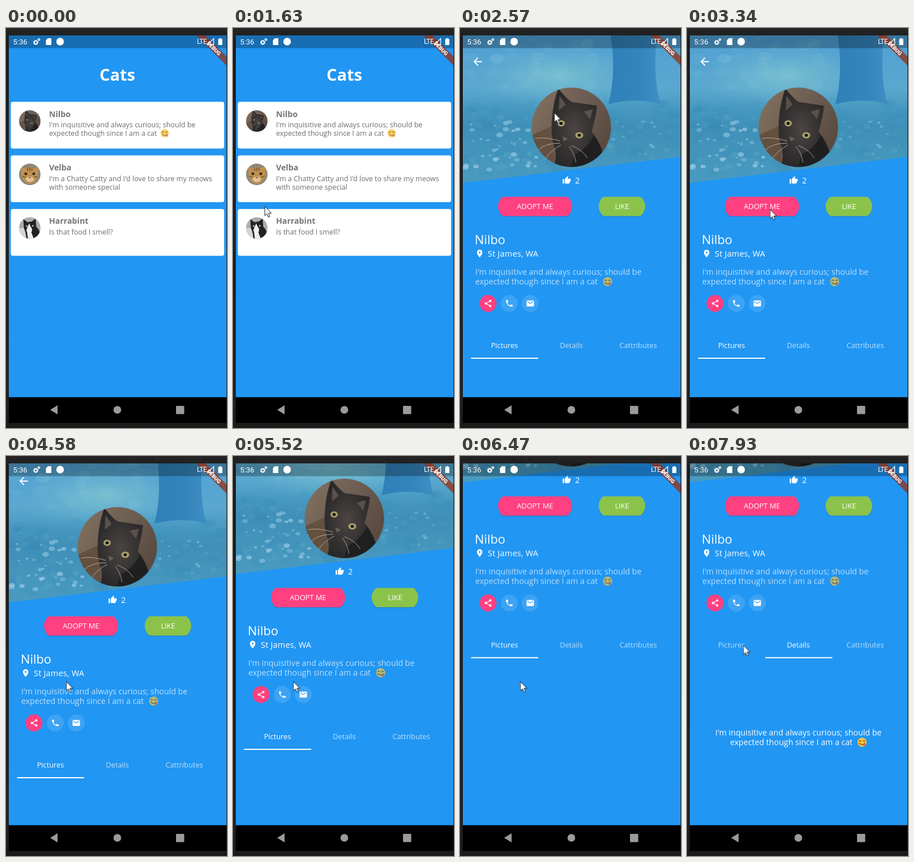
An HTML page for the animation above (8 s loop, 390 px wide and 705 px high).

```html
<!DOCTYPE html>
<html lang="en">
<head>
<meta charset="utf-8">
<title>Cats</title>
<style>
html, body { margin: 0; width: 100%; height: 100%; overflow: hidden; background: #1f1f1f; }
svg { display: block; width: 100vw; height: 100vh; }
text { font-family: "Open Sans", "Noto Sans", sans-serif; fill: #fff; }
.title { font-size: 29px; font-weight: 700; }
.name { font-size: 14.2px; font-weight: 700; fill: #757575; }
.body { font-size: 12.5px; fill: #6c6c6c; }
.big { font-size: 21.8px; }
.place { font-size: 14.5px; font-weight: 500; letter-spacing: .2px; }
.bio { font-size: 14.2px; font-weight: 500; }
.label { font-size: 12.8px; font-weight: 500; }
.mid { text-anchor: middle; }
.sys { font-family: Roboto, sans-serif; font-size: 13px; }
.tag { font-family: Roboto, sans-serif; font-size: 9.5px; font-weight: 900; }

.scroll, .detail, .hero, .thumb, .bar, .tab1, .tab2, .info, .cursor {
  animation: 8s step-end infinite;
}
.scroll { animation-name: scroll; }
.detail { animation-name: fade; }
.hero { animation-name: fly; }
.thumb { animation-name: leave; }
.bar { animation-name: slide; }
.tab1 { animation-name: dim; }
.tab2 { animation-name: lit; }
.info { animation-name: info; }
.cursor { animation-name: move, enter; }

@keyframes scroll {
  0% { transform: translateY(0); }
  57.2% { transform: translateY(-15px); }
  62.95% { transform: translateY(-45px); }
  68.95% { transform: translateY(-65px); }
  69.95% { transform: translateY(-88px); }
  70.95% { transform: translateY(-107px); }
  71.95% { transform: translateY(-123px); }
  72.85% { transform: translateY(-138px); }
  73.8% { transform: translateY(-150px); }
  75.7% { transform: translateY(-168px); }
  76.7% { transform: translateY(-186px); }
  77.75% { transform: translateY(-202px); }
  78.8% { transform: translateY(-214px); }
  79.8% { transform: translateY(-222px); }
  80.8%, 100% { transform: translateY(-226.5px); }
}
@keyframes fade {
  0% { opacity: 0; }
  30.2% { opacity: .64; }
  31.2% { opacity: .9; }
  32.1%, 100% { opacity: 1; }
}
@keyframes fly {
  0% { opacity: 0; transform: translate(23px, 145px) scale(.27); }
  30.2% { opacity: 1; transform: translate(119px, 112px) scale(.921, .871); }
  31.2% { opacity: 1; transform: translate(124.5px, 107px) scale(.985, .97); }
  32.1%, 100% { opacity: 1; transform: translate(126.5px, 105px); }
}
@keyframes leave { 0% { opacity: 1; } 30.2%, 100% { opacity: 0; } }
@keyframes slide {
  0% { transform: translateX(0); }
  92.3% { transform: translateX(22px); }
  93.3% { transform: translateX(66px); }
  94.3% { transform: translateX(101px); }
  95.2% { transform: translateX(116px); }
  96.2%, 100% { transform: translateX(118.5px); }
}
@keyframes dim { 0% { opacity: 1; } 92.3% { opacity: .9; } 93.3% { opacity: .8; } 94.3%, 100% { opacity: .7; } }
@keyframes lit { 0% { opacity: .7; } 92.3% { opacity: .8; } 93.3% { opacity: .9; } 94.3%, 100% { opacity: 1; } }
@keyframes info { 0% { opacity: 0; } 92.3%, 100% { opacity: 1; } }
@keyframes enter { 0% { opacity: 0; } 18.45%, 100% { opacity: 1; } }
@keyframes move {
  0% { transform: translate(-11px, 422px); }
  18.45% { transform: translate(-11px, 422px); animation-timing-function: steps(8, jump-start); }
  26% { transform: translate(168px, 135px); }
  27.2% { transform: translate(166.5px, 149.5px); }
  34.08% { transform: translate(166.5px, 149.5px); animation-timing-function: steps(9, jump-start); }
  42.6% { transform: translate(146.5px, 319.5px); }
  48.58% { transform: translate(146.5px, 319.5px); animation-timing-function: steps(5, jump-start); }
  53.4% { transform: translate(106.5px, 397.5px); }
  83.7% { transform: translate(106.5px, 397.5px); animation-timing-function: steps(7, jump-start); }
  90.4% { transform: translate(185.5px, 318.5px); }
  96.2% { transform: translate(185.5px, 318.5px); animation-timing-function: steps(4, jump-start); }
  100% { transform: translate(99.5px, 333.5px); }
}
</style>
</head>
<body>
<svg viewBox="0 0 390 705" preserveAspectRatio="none">
<defs>
  <linearGradient id="frame" x2="0" y2="1">
    <stop offset="0" stop-color="#262626"/><stop offset=".03" stop-color="#1b1b1b"/>
    <stop offset=".9" stop-color="#222"/><stop offset="1" stop-color="#1c1a1a"/>
  </linearGradient>
  <linearGradient id="meadow" x2="0" y2="1">
    <stop offset="0" stop-color="#4f9fd3"/><stop offset=".36" stop-color="#5aa8cf"/>
    <stop offset=".5" stop-color="#4698c0"/><stop offset=".62" stop-color="#3f90b8"/>
    <stop offset="1" stop-color="#4a9bc0"/>
  </linearGradient>
  <radialGradient id="glade">
    <stop offset="0" stop-color="#7cc2cf" stop-opacity=".9"/><stop offset="1" stop-color="#6db6d0" stop-opacity="0"/>
  </radialGradient>
  <linearGradient id="trunk">
    <stop offset="0" stop-color="#2f80b8"/><stop offset=".6" stop-color="#3585bd"/>
    <stop offset="1" stop-color="#3f8fc6"/>
  </linearGradient>
  <linearGradient id="wall" x2="1" y2=".6">
    <stop offset="0" stop-color="#857360"/><stop offset=".5" stop-color="#6f6054"/><stop offset="1" stop-color="#5a4a40"/>
  </linearGradient>
  <radialGradient id="fur" cx=".42" cy=".52" r=".6">
    <stop offset="0" stop-color="#4b4644"/><stop offset=".5" stop-color="#363333"/><stop offset="1" stop-color="#252324"/>
  </radialGradient>
  <clipPath id="screen"><path d="M5 13H389V651H5Z"/></clipPath>
  <clipPath id="round"><circle cx="70" cy="70" r="70"/></clipPath>
  <clipPath id="slope"><path d="M5 13H389V227L5 273Z"/></clipPath>

  <g id="cat1" clip-path="url(#round)">
    <path fill="url(#wall)" d="M0 0H140V140H0Z"/>
    <path fill="#64503f" d="M0 84L40 66V140H0Z"/>
    <path fill="url(#fur)" d="M47 2C56 12 64 22 72 26C86 27 100 30 115 32C114 50 109 64 106 78C118 92 128 112 130 140H38C44 126 43 116 40 104C32 84 34 36 47 2Z"/>
    <path fill="#5b514c" d="M49 14L60 30L48 40ZM108 38L92 42L103 56Z"/>
    <path fill="#201f20" d="M76 118Q98 108 110 84Q126 108 130 140H70Z"/>
    <g fill="#aaa16a"><ellipse cx="52" cy="63" rx="6.5" ry="5.5"/><ellipse cx="84" cy="84" rx="7" ry="5.5"/></g>
    <circle cx="52" cy="63" r="2.6"/><circle cx="84" cy="84" r="2.6"/>
    <path fill="#6d615c" d="M54 86L64 90L57 95Z"/>
    <path fill="none" stroke="#c9c3bd" stroke-width=".8" d="M50 94Q22 86 6 90M50 98Q24 98 12 110M52 101Q32 112 24 126M66 104Q76 116 78 132M70 102Q90 110 98 124"/>
  </g>
  <g id="cat2" clip-path="url(#round)">
    <path fill="#8d8878" d="M0 0H140V140H0Z"/>
    <path fill="#c08f50" d="M14 22L42 30Q70 20 98 30L128 20L124 76Q112 128 70 132Q26 126 18 76Z"/>
    <path fill="none" stroke="#77512b" stroke-width="6" d="M56 28V48M70 26V48M84 28V48M22 84L40 88M118 84L100 88"/>
    <g fill="#2c2a1e"><circle cx="44" cy="66" r="9"/><circle cx="96" cy="66" r="9"/></g>
    <ellipse cx="70" cy="102" rx="26" ry="18" fill="#dfc49b"/><path fill="#8d5340" d="M60 88H80L70 98Z"/>
  </g>
  <g id="cat3" clip-path="url(#round)">
    <path fill="#a9adad" d="M0 0H140V140H0Z"/><path fill="#d5d5d1" d="M0 70H50V140H0Z"/>
    <path fill="#202124" d="M28 12L54 32L84 28L108 8L112 62Q142 88 140 140H48Q44 96 32 72Z"/>
    <path fill="#efeeec" d="M66 40L76 62Q92 80 80 98L96 140H58L52 96Q44 84 54 68Z"/>
    <g fill="#b4b582"><circle cx="50" cy="58" r="6"/><circle cx="90" cy="56" r="6"/></g>
  </g>
  <g id="yum">
    <circle r="8" fill="#fbc83c"/>
    <path fill="none" stroke="#6b4a1c" stroke-width="1.3" stroke-linecap="round" d="M-5 -1.6Q-3.4 -4 -1.8 -1.6M1.8 -1.6Q3.4 -4 5 -1.6M-5 1.8Q0 6.5 5 1.8"/>
    <path fill="#e8574e" d="M.8 4.2L5 2.4Q7 5.6 4.6 6.6Q2.4 7 .8 4.2Z"/>
  </g>
  <path id="card" fill="#fff" d="M12.500 130H381a4 4 0 0 1 4 4V208.500a4 4 0 0 1-4 4H12.500a4 4 0 0 1-4-4V134a4 4 0 0 1 4-4Z"/>
  <path id="adopt" d="M75.500 297.500H189.500A21.500 21.500 0 0 1 189.500 331.500H75.500A21.500 21.500 0 0 1 75.500 297.500Z"/>
  <path id="like" d="M253 297.500H318.500A21.500 21.500 0 0 1 318.500 331.500H253A21.500 21.500 0 0 1 253 297.500Z"/>
</defs>

<path fill="url(#frame)" d="M0 0H390V705H0Z"/>

<g clip-path="url(#screen)">
  <path fill="#2196f3" d="M5 13H389V651H5Z"/>
  <text class="title mid" x="196.500" y="93">Cats</text>
  <use href="#card"/><use href="#card" y="94.500"/><use href="#card" y="189"/>
  <use class="thumb" href="#cat1" transform="translate(23 145) scale(.271)"/>
  <use href="#cat2" transform="translate(23 239) scale(.271)"/>
  <use href="#cat3" transform="translate(23 333.500) scale(.271)"/>
  <text class="name" x="76" y="156.500">Nilbo</text>
  <text class="body" x="76" y="175">I'm inquisitive and always curious; should be</text>
  <text class="body" x="76" y="190">expected though since I am a cat</text>
  <use href="#yum" transform="translate(280 185.500) scale(.92)" opacity=".8"/>
  <text class="name" x="76" y="250.500">Velba</text>
  <text class="body" x="76" y="269.500">I'm a Chatty Catty and I'd love to share my meows</text>
  <text class="body" x="76" y="284.500">with someone special</text>
  <text class="name" x="76" y="345">Harrabint</text>
  <text class="body" x="76" y="363.500">Is that food I smell?</text>

  <g class="detail">
    <path fill="#2196f3" d="M5 13H389V651H5Z"/>
    <g class="scroll">
      <g clip-path="url(#slope)">
        <path fill="url(#meadow)" d="M5 13H389V273H5Z"/>
        <ellipse cx="175" cy="85" rx="150" ry="58" fill="url(#glade)"/>
        <path fill="url(#trunk)" d="M266 13H347Q340 90 354 134Q310 122 262 134Q276 80 266 13Z"/>
        <g id="field"></g>
      </g>
      <g fill="#fff">
        <path transform="translate(20 48) scale(.934)" d="M20 11H7.800l5.600-5.600L12 4l-8 8 8 8 1.400-1.400L7.800 13H20z"/>
        <path transform="translate(180.500 260.500) scale(.65)" d="M1 21h4V9H1v12zm22-11c0-1.100-.9-2-2-2h-6.300l1-4.600V3.100c0-.4-.2-.8-.4-1.100L14.200 1 7.600 7.600C7.200 8 7 8.500 7 9v10c0 1.100.9 2 2 2h9c.8 0 1.500-.5 1.800-1.200l3-7.100c.1-.2.2-.4.2-.7z"/>
        <path transform="translate(26.500 389.500) scale(.68)" d="M12 2C8.100 2 5 5.100 5 9c0 5.300 7 13 7 13s7-7.700 7-13c0-3.900-3.100-7-7-7zm0 9.500a2.500 2.500 0 1 1 0-5 2.500 2.500 0 0 1 0 5z"/>
      </g>
      <text class="place" x="203" y="274">2</text>
      <g fill="#134f86" opacity=".25" transform="translate(0 1.500)"><use href="#adopt"/><use href="#like"/></g>
      <use href="#adopt" fill="#ff4081"/>
      <use href="#like" fill="#8bc34a"/>
      <text class="label mid" x="132.300" y="319">ADOPT ME</text>
      <text class="label mid" x="286" y="319">LIKE</text>
      <text class="big" x="26" y="381">Nilbo</text>
      <text class="place" x="49" y="403">St James, WA</text>
      <g opacity=".7">
        <text class="bio" x="27" y="434.500">I'm inquisitive and always curious; should be</text>
        <text class="bio" x="27" y="451.500">expected though since I am a cat</text>
        <use href="#yum" x="260.500" y="447"/>
      </g>
      <circle cx="49.500" cy="485.500" r="15" fill="#ff4081"/>
      <g fill="#fff" fill-opacity=".13"><circle cx="87" cy="485.500" r="15"/><circle cx="124" cy="485.500" r="15"/></g>
      <g fill="#fff">
        <path fill="none" stroke="#fff" stroke-width="1.300" d="M53.500 481L45.500 485.500L53.500 490"/>
        <circle cx="53.500" cy="481" r="2"/><circle cx="45.500" cy="485.500" r="2"/><circle cx="53.500" cy="490" r="2"/>
        <path transform="translate(79.200 477.700) scale(.65)" d="M6.600 10.800c1.400 2.800 3.800 5.100 6.600 6.600l2.200-2.200c.3-.3.700-.4 1-.2 1.100.4 2.300.6 3.600.6.600 0 1 .4 1 1V20c0 .6-.4 1-1 1C10.600 21 3 13.400 3 4c0-.6.5-1 1-1h3.500c.6 0 1 .5 1 1 0 1.300.2 2.500.6 3.600.1.400 0 .7-.2 1z"/>
        <path transform="translate(116.200 477.700) scale(.65)" d="M20 4H4c-1.100 0-2 .9-2 2v12c0 1.100.9 2 2 2h16c1.100 0 2-.9 2-2V6c0-1.100-.9-2-2-2zm0 4l-8 5-8-5V6l8 5 8-5z"/>
      </g>
      <text class="label mid tab1" x="78.500" y="564">Pictures</text>
      <text class="label mid tab2" x="196.500" y="564">Details</text>
      <text class="label mid" x="314.500" y="564" opacity=".7">Cattributes</text>
      <path class="bar" fill="#fff" d="M19.500 581H138V583H19.500Z"/>
      <g class="info">
        <text class="bio mid" x="196.700" y="719">I'm inquisitive and always curious; should be</text>
        <text class="bio" x="76" y="735.500">expected though since I am a cat</text>
        <use href="#yum" x="309" y="731"/>
      </g>
    </g>
  </g>
  <g class="scroll"><g class="hero"><use href="#cat1"/></g></g>

  <path opacity=".27" d="M5 13H389V35.500H5Z"/>
  <path fill="#963219" fill-opacity=".76" d="M336 13H352L389 50V66Z"/>
  <text class="tag mid" transform="translate(367 36) rotate(45)" y="3.300">DEBUG</text>
  <text class="sys" x="12.500" y="28.500">5:36</text>
  <text class="sys" x="337" y="28.300" style="font-size:12px;letter-spacing:-.5px">LTE</text>
  <g fill="#fff">
    <circle cx="95.500" cy="24" r="6.700"/>
    <path d="M74 18H80V30H70.500V21.500Z"/>
    <path fill="none" stroke="#fff" stroke-width="1.300" d="M366.500 18.500V29.500H355.500Z"/>
    <path d="M374.500 19.300H376.500V18H379.700V19.300H381.700V30H374.500Z"/>
    <g fill="none" stroke="#fff">
      <circle cx="52.500" cy="25.500" r="2.700" stroke-width="1.800"/>
      <circle cx="52.500" cy="25.500" r="4" stroke-width="1.200" stroke-dasharray="1.600 1.540"/>
      <circle cx="58" cy="20.500" r="1.600" stroke-width="1.500"/>
    </g>
  </g>
</g>

<path d="M5 650.700H389V696H5Z"/>
<g fill="#9b9b9b">
  <path d="M78 673L91 665V681Z"/><circle cx="196.500" cy="673" r="6.800"/>
  <rect x="300" y="666" width="14.500" height="14.500" rx="1"/>
</g>
<path class="cursor" fill="#fff" stroke="#111" stroke-linejoin="round" d="M0 0V16.500L3.800 13L6.400 19L9 17.800L6.500 12H11.500Z"/>
</svg>
<script>
// Soft seeded leaves and blossoms for the meadow
let seed = 7;
const rnd = () => (seed = seed * 16807 % 2147483647) / 2147483647;
const dots = (n, x, y, w, h, r, fill, alpha) => Array.from({ length: n }, () => {
  const size = r * (.5 + rnd());
  return `<ellipse cx="${x + w * rnd()}" cy="${y + h * rnd()}" rx="${size}" ry="${size * .7}" fill="${fill}" opacity="${alpha * (.5 + rnd() / 2)}"/>`;
}).join('');
document.getElementById('field').innerHTML =
  dots(30, 5, 20, 250, 90, 9, '#8cc8d8', .15) +
  dots(70, 5, 130, 384, 135, 9, '#3488b2', .25) +
  dots(60, 5, 150, 384, 115, 5, '#62b2c4', .25) +
  dots(38, 8, 165, 130, 85, 4, '#a5d2ec', .65) +
  dots(16, 250, 165, 135, 60, 2.4, '#92c8e4', .5);
</script>
</body>
</html>
```
